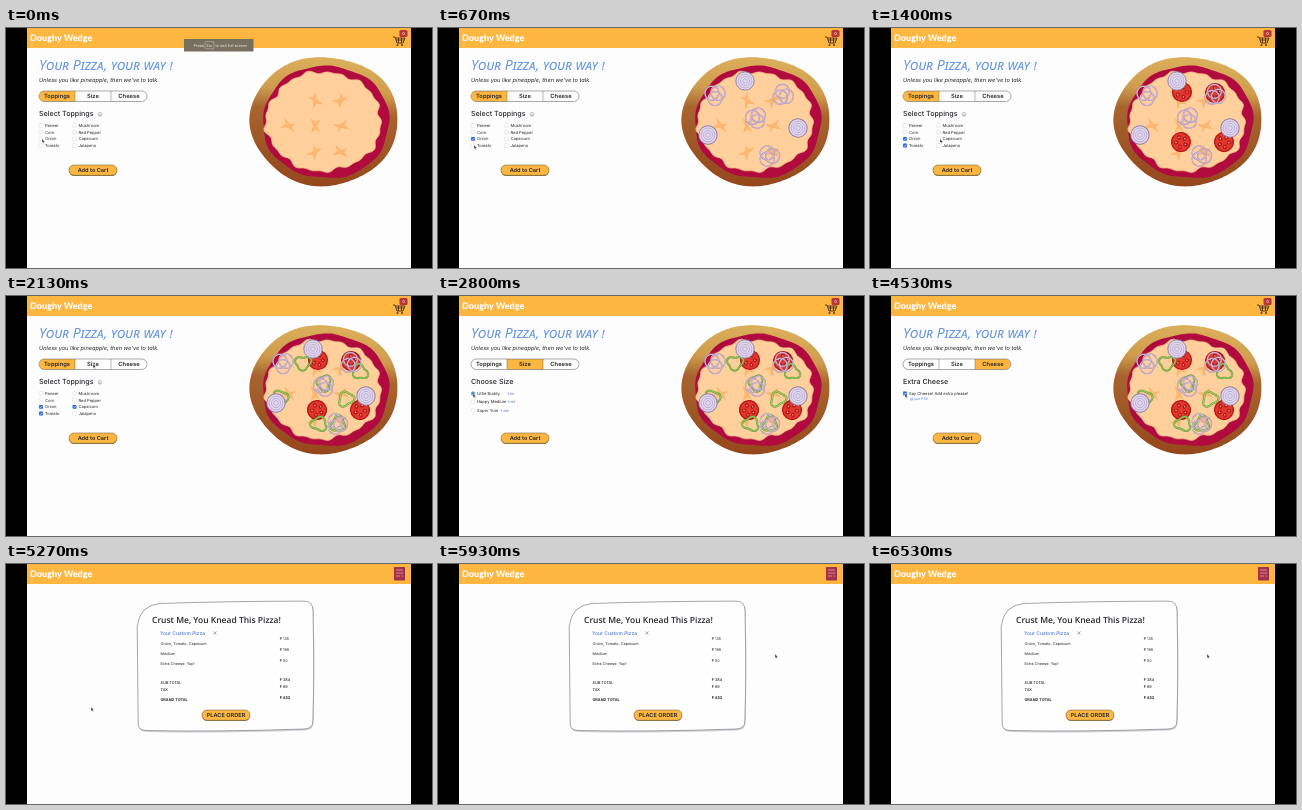
An HTML page that plays this animation: 426 by 240 pixels, repeating every 6590 ms.

```html
<!DOCTYPE html>
<html lang="en">
<head>
<meta charset="utf-8">
<title>Pizza builder</title>
<style>
  html, body { margin: 0; width: 100%; height: 100%; overflow: hidden; background: #000; }
  svg { display: block; width: 100%; height: 100%; }
  text { font-family: Inter, "Noto Sans", sans-serif; fill: #25252b; white-space: pre; text-rendering: geometricPrecision; }
  .blue { fill: #4a78d8; }
  .light { fill: #eee; }
  .brand { font-family: Lato, sans-serif; font-weight: 900; fill: #fff; }
  .title { font-family: "Noto Sans", sans-serif; font-variant: small-caps; font-style: italic; font-weight: 500; fill: #6797dd; }
  .sans { font-family: "Open Sans", "Noto Sans", sans-serif; font-weight: 600; }
</style>
</head>
<body>
<svg id="stage" viewBox="0 0 426 240">
  <defs>
    <linearGradient id="wood" x1=".55" y1="0" x2=".48" y2="1">
      <stop offset="0" stop-color="#dcb05c"/>
      <stop offset=".26" stop-color="#cf9c4e"/>
      <stop offset=".42" stop-color="#a8642e"/>
      <stop offset="1" stop-color="#94471c"/>
    </linearGradient>
  </defs>
</svg>
<script>
const LOOP = 6590;
const NS = 'http://www.w3.org/2000/svg';
const stage = document.getElementById('stage');
const GOLD = '#fdb640';

function add(parent, tag, attrs = {}, text) {
  const el = document.createElementNS(NS, tag);
  for (const k in attrs) el.setAttribute(k, attrs[k]);
  if (text) el.textContent = text;
  parent.appendChild(el);
  return el;
}
const group = (p, x = 0, y = 0, turn = 0) =>
  add(p, 'g', { transform: `translate(${x} ${y}) rotate(${turn})` });
const rect = (p, x, y, width, height, attrs) => add(p, 'rect', { x, y, width, height, ...attrs });
const circle = (p, cx, cy, r, attrs) => add(p, 'circle', { cx, cy, r, ...attrs });
const path = (p, d, attrs) => add(p, 'path', { d, ...attrs });
const label = (p, x, y, size, text, attrs) =>
  add(p, 'text', { x, y, 'font-size': size, ...attrs }, text);
const line = (stroke, width) => ({ fill: 'none', stroke, 'stroke-width': width });
const mid = { 'font-weight': 600, 'text-anchor': 'middle' };

// Closed outline whose radius ripples with each [count, depth]
function blob(cx, cy, rx, ry, ...waves) {
  const points = Array.from({ length: 180 }, (_, i) => {
    const a = i * Math.PI / 90;
    const k = waves.reduce((sum, [n, depth]) => sum + depth * Math.sin(n * a + n), 1);
    return (cx + rx * k * Math.cos(a)).toFixed(2) + ' ' + (cy + ry * k * Math.sin(a)).toFixed(2);
  });
  return 'M' + points.join('L') + 'Z';
}

// Page and header
rect(stage, 21, 0, 384, 240, { fill: '#fdfdfd' });
rect(stage, 21, 0, 384, 20, { fill: GOLD });
label(stage, 24, 12.6, 9, 'Doughy Wedge', { class: 'brand' });

const shop = group(stage);
const bill = group(stage);

// Shop page
path(shop, 'M387 9h2l2 6h6l2-5h-9M390 12h8M392.5 10v5M395.5 10v5', line('#5b3a24', 1));
for (const x of [391.5, 396]) circle(shop, x, 17, 1, { fill: '#5b3a24' });
rect(shop, 393.5, 2, 8, 7, { rx: 1.5, fill: '#b8323a' });
label(shop, 397.5, 7, 4, '0', { ...mid, class: 'light' });

label(shop, 33, 42.2, 14.1, 'Your Pizza, your way !', { class: 'title' });
label(shop, 33, 53.8, 5.65, "Unless you like pineapple, then we've to talk.", { 'font-style': 'italic' });

const tabX = i => 51 + i * 36;
const tabFills = [
  path(shop, 'M69 63H38.5a5.25 5.25 0 0 0 0 10.5H69Z', { fill: GOLD }),
  rect(shop, 69, 63, 36, 10.5, { fill: GOLD }),
  path(shop, 'M105 63h30.5a5.25 5.25 0 0 1 0 10.5H105Z', { fill: GOLD })
];
rect(shop, 33, 63, 108, 10.5, { rx: 5.25, ...line('#55555a', .5) });
path(shop, 'M69 63v10.5M105 63v10.5', line('#55555a', .4));
['Toppings', 'Size', 'Cheese'].forEach((t, i) => label(shop, tabX(i), 70.4, 5.8, t, mid));

function button(p, x, y, text) {
  rect(p, x, y + .5, 48, 10.5, { rx: 5.2, fill: '#8a7448' });
  rect(p, x, y, 48, 10.3, { rx: 5.1, fill: GOLD, stroke: '#6b5a38', 'stroke-width': .5 });
  label(p, x + 24, y + 7.2, 5.6, text, mid);
}
button(shop, 63, 137, 'Add to Cart');

// Draws a round or square control and returns the part that shows it chosen
function control(p, y, text, round, x = 35) {
  const box = { x: x - 1.9, y: y - 1.9, width: 3.8, height: 3.8, rx: round ? 1.9 : .6 };
  add(p, 'rect', { ...box, fill: '#fff', stroke: '#ccc', 'stroke-width': .35 });
  label(p, x + 4, y + 1.5, 4.1, text);
  const on = group(p);
  add(on, 'rect', { ...box, fill: '#2468dc' });
  if (round) circle(on, x, y, 1.5, line('#fff', .4));
  else path(on, `M${x - 1.1} ${y}l.9 .9 1.5-1.8`, line('#fff', .6));
  return on;
}

const ROW = 97.4;
const toppingY = row => ROW + row * 6.7;
const sizeY = i => ROW + i * 8.4;
const panels = ['Select Toppings', 'Choose Size', 'Extra Cheese'].map(t => {
  const panel = group(shop);
  label(panel, 33, 88.4, 7.1, t, { 'font-weight': 500 });
  return panel;
});
circle(panels[0], 94, 86.3, 1.9, line('#777', .4));
label(panels[0], 94, 87.6, 3.4, 'i', mid);

const boxes = {};
['Paneer', 'Corn', 'Onion', 'Tomato', 'Mushroom', 'Red Pepper', 'Capsicum', 'Jalapeno'].forEach((name, i) => {
  boxes[name] = control(panels[0], toppingY(i % 4), name, false, i < 4 ? 35 : 68.5);
});
const radios = ['Little Buddy', 'Happy Medium', 'Super Yum'].map((name, i) => {
  const on = control(panels[1], sizeY(i), name, true);
  label(panels[1], 42 + name.length * 2.3, sizeY(i) + 1.3, 3, `₹ ${i}99`.replace(' 0', ' '), { class: 'blue' });
  return on;
});
const extra = control(panels[2], ROW, 'Say Cheese! Add extra please!', false);
label(panels[2], 40, 104.4, 3.4, '@ just ₹ 50', { class: 'blue' });

// Pizza
path(shop, blob(318, 93, 74, 64.5, [3, .01], [5, .01]), { fill: 'url(#wood)' });
path(shop, blob(320, 94, 63.5, 56.5, [4, .012], [9, .012]), { fill: '#b00a3e' });
path(shop, blob(317.5, 93.5, 57.5, 49.5, [5, .015], [13, .02], [21, .018]),
  { fill: '#ffd09c', stroke: '#f6b583', 'stroke-width': .8 });
for (let i = 0; i < 9; i++) {
  const col = i % 3, row = (i - col) / 3;
  if (col || row === 1)
    path(group(shop, 283 + col * 26, 72 + row * 26, i * 70),
      'M-8 -3L0 -2L7 -6L4 0L8 5L0 2L-5 6L-3 1Z', { fill: '#fbb66f' });
}

const drawTopping = {
  tomato(g) {
    circle(g, 0, 0, 9.4, { fill: '#e2382c', stroke: '#b9161c', 'stroke-width': 1.4 });
    for (let a = 20; a < 380; a += 72) {
      const seed = group(g, 0, 0, a);
      add(seed, 'ellipse', { cy: -5, rx: 1.9, ry: 2.3, fill: '#b5171c' });
      circle(seed, 0, -5, .7, { fill: '#fbc79a' });
    }
  },
  pepper(g) {
    const ring = blob(0, 0, 7.2, 6.8, [3, .18], [2, .06]);
    path(g, ring, line('#5f9d33', 2.1));
    path(g, ring, line('#b4d67c', .9));
  },
  rings(g) {
    for (let a = 0; a < 360; a += 120) {
      const ring = group(g, 0, 0, a);
      circle(ring, 0, 3.6, 7, line('#9f83b5', 1.4));
      circle(ring, 0, 3.6, 6.9, line('#eadff0', .6));
    }
  },
  slice(g) {
    circle(g, 0, 0, 9.2, { fill: '#e2d8ee', stroke: '#947da8', 'stroke-width': 1 });
    for (let r = 2.3; r < 8; r += 2.3) circle(g, 0, 0, r, line('#b3a0cb', .7));
  }
};
function scatter(layer, kind, ...points) {
  points.forEach(([x, y], i) => drawTopping[kind](group(layer, x, y, i * 50)));
}
const layers = { Tomato: group(shop), Capsicum: group(shop), Onion: group(shop) };
scatter(layers.Tomato, 'tomato', [312, 64], [345, 65], [311, 114], [354, 114]);
scatter(layers.Capsicum, 'pepper', [297, 67], [354, 76], [318, 87], [340, 103], [313, 128], [275, 102], [332, 128]);
scatter(layers.Onion, 'rings', [277, 67], [345, 67], [318, 90], [331, 128]);
scatter(layers.Onion, 'slice', [307, 53], [270, 107], [360, 100]);

// Bill page
rect(bill, 388, 3, 11, 13.5, { rx: .8, fill: '#a3304c' });
path(bill, 'M390 6h7M390 9h7M390 12h4M395.5 12h1.5', line('#f0a09a', .8));
const card = 'M154 39.5Q230 37 299 37.2Q307 37.5 307 47Q308.5 110 306.8 158Q306.5 164.8 298 165Q210 168 140 166.5Q132 166 132.2 160L131.2 62Q134 41 154 39.5Z';
path(group(bill, .6, 1.4), card, { fill: '#d2d2d6' });
path(bill, card, { fill: '#fefefe', stroke: '#6b6b74', 'stroke-width': .6 });
label(bill, 146, 58.6, 8.5, 'Crust Me, You Knead This Pizza!', { class: 'sans' });
label(bill, 154, 71.4, 5, 'Your Custom Pizza', { class: 'blue', 'font-weight': 500 });
path(bill, 'M207.4 67.4l3 3m0-3l-3 3', line('#5a6688', .55));

function entry(y, name, priceY, price, weight) {
  label(bill, 154.5, y, 3.8, name, { 'font-weight': weight });
  label(bill, 273.8, priceY, 3.8, '₹ ' + price, { 'font-weight': weight });
}
const items = { 'Onion, Tomato, Capsicum': 135, 'Medium': 199, 'Extra Cheese: Yup!': 50 };
Object.entries(items).forEach(([name, price], i) => entry(80.8 + i * 10, name, 76.4 + i * 11, price, 400));
const subtotal = Object.values(items).reduce((a, b) => a + b);
const tax = Math.round(subtotal * .18);
entry(119.6, 'SUB TOTAL', 117, subtotal, 500);
entry(126.6, 'TAX', 124.2, tax, 500);
entry(137, 'GRAND TOTAL', 135.4, subtotal + tax, 700);
button(bill, 196, 146, 'PLACE ORDER');

// Full-screen hint
const hint = group(stage);
rect(hint, 178, 11, 69.5, 12.5, { fill: '#77705f' });
rect(hint, 199, 13.7, 9, 7, { rx: .8, ...line('#ddd', .4) });
label(hint, 187.5, 18.6, 3.9, 'Press', { class: 'light' });
label(hint, 200.5, 18.6, 3.6, 'Esc', { class: 'light' });
label(hint, 209.5, 18.6, 3.9, 'to exit full screen', { class: 'light' });

const pointer = path(stage, 'M0 0V4.2L1 3.3L1.7 4.8L2.4 4.5L1.7 3.1H3Z', {
  fill: '#3a3a3e', stroke: '#fff', 'stroke-width': .35
});

// Where the pointer rests and when it clicks there
const clicks = [
  { name: 'Onion', at: 330, x: 36, y: toppingY(2) },
  { name: 'Tomato', at: 870, x: 36, y: toppingY(3) },
  { name: 'Capsicum', at: 1530, x: 70, y: toppingY(2) },
  { name: 'size', at: 2270, x: tabX(1), y: 68 },
  { name: 'small', at: 2800, x: 35, y: sizeY(0) },
  { name: 'medium', at: 3300, x: 35, y: sizeY(1) },
  { name: 'cheese', at: 3870, x: tabX(2), y: 68 },
  { name: 'extra', at: 4400, x: 35, y: ROW },
  { name: 'order', at: 5070, x: 85, y: 143 },
  { name: 'rest', at: 6000, x: 337, y: 90 }
];
const REST = 140, TRAVEL = 330;
const clickTime = Object.fromEntries(clicks.map(c => [c.name, c.at]));

// Moves between stops, pausing around each click
function pointerAt(t) {
  const i = clicks.findIndex(c => t < c.at + REST);
  const to = clicks.at(i), from = clicks[i - 1] ?? to;
  const u = Math.max(0, Math.min(1, (t - to.at + REST + TRAVEL) / TRAVEL));
  const k = u * u * (3 - 2 * u);
  return [from.x + (to.x - from.x) * k, from.y + (to.y - from.y) * k];
}

const show = (el, on) => el.setAttribute('display', on ? 'inline' : 'none');

function draw(t) {
  const done = name => t >= (clickTime[name] ?? Infinity);
  const tab = done('size') + done('cheese');
  const size = +done('medium');
  show(shop, !done('order'));
  show(bill, done('order'));
  for (let i = 0; i < 3; i++) {
    show(tabFills[i], i === tab);
    show(panels[i], i === tab);
    show(radios[i], i === size);
  }
  for (const name in boxes) show(boxes[name], done(name));
  for (const name in layers) show(layers[name], done(name));
  show(extra, done('extra'));
  hint.setAttribute('opacity', Math.max(0, Math.min(1, (600 - t) / 300)));
  pointer.setAttribute('transform', `translate(${pointerAt(t)})`);
}

const start = performance.now();
function tick() {
  draw((performance.now() - start) % LOOP);
  requestAnimationFrame(tick);
}
draw(0);
requestAnimationFrame(tick);
</script>
</body>
</html>
```
